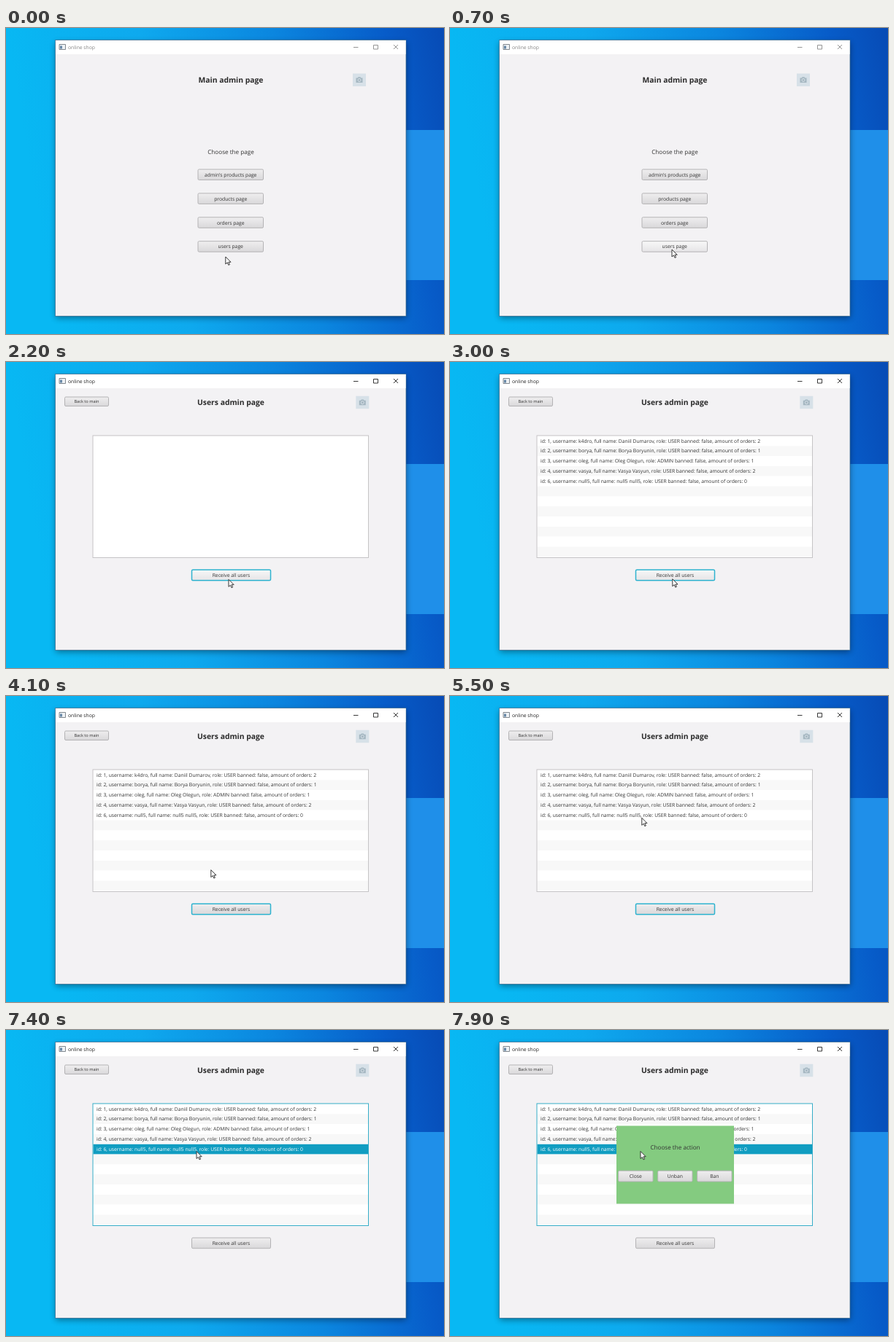
An HTML page that plays this animation: 600x420 px, repeating every 8 s.

```html
<!DOCTYPE html>
<html lang="en">
<head>
<meta charset="utf-8">
<title>online shop</title>
<style>
  html, body { margin: 0; width: 100%; height: 100%; overflow: hidden; }
  svg { display: block; width: 600px; height: 420px; }
  text { font: 6.75px "Open Sans", "Noto Sans", sans-serif; fill: #333; text-rendering: geometricPrecision; }
  .mid { text-anchor: middle; }
  .head { font-size: 10.35px; font-weight: 700; fill: #2b2b2b; }
  .note { font-size: 8.15px; }
  .small { font-size: 5.65px; }
  .btn rect { fill: url(#face); stroke: #b4b3b5; }
  .btn.hover rect { fill: url(#lit); }
  .btn.focus rect { stroke: #2fb3cf; stroke-width: 1.5; }
  #bar { fill: none; stroke: #8a8a8a; }
  #bar text { fill: #858585; stroke: none; }
  .active #bar { stroke: #222; }
  .active #bar text { fill: #222; }
  .picked text { fill: #fff; }
</style>
</head>
<body>
<svg viewBox="0 0 600 420">
  <defs>
    <linearGradient id="sky" x2="1" y2="-.12">
      <stop offset="0" stop-color="#08b8f3"/>
      <stop offset=".3" stop-color="#0ea9ee"/>
      <stop offset=".6" stop-color="#0b86df"/>
      <stop offset=".85" stop-color="#075cc9"/>
      <stop offset="1" stop-color="#0749b3"/>
    </linearGradient>
    <linearGradient id="face" x2="0" y2="1">
      <stop offset="0" stop-color="#efeeef"/>
      <stop offset="1" stop-color="#d9d8da"/>
    </linearGradient>
    <linearGradient id="lit" x2="0" y2="1">
      <stop offset="0" stop-color="#f8f8f8"/>
      <stop offset="1" stop-color="#e5e4e6"/>
    </linearGradient>
    <filter id="blur" x="-10%" y="-10%" width="120%" height="120%"><feGaussianBlur stdDeviation="4"/></filter>
    <g id="camera">
      <rect width="18" height="17.5" fill="#d7e1e8"/>
      <path d="M4.5 6H6.7L7.5 4.7H10.5L11.3 6H13.5V12.5H4.5Z" fill="#a5b7c1"/>
      <circle cx="9" cy="9" r="2" fill="#a5b7c1" stroke="#d7e1e8"/>
    </g>
  </defs>

  <rect width="600" height="420" fill="url(#sky)"/>
  <rect x="540" y="140" width="60" height="206" fill="#1f8fe9"/>
  <rect x="68" y="20" width="480" height="378" opacity=".4" filter="url(#blur)"/>
  <rect x="67.5" y="16.5" width="480.5" height="379" fill="#f3f2f4" stroke="#35658a" stroke-opacity=".7"/>
  <rect x="68" y="17" width="479.5" height="19" fill="#fff"/>

  <g id="bar">
    <text x="85" y="29">online shop</text>
    <path d="M476 26.5H482.5M503.5 23.5H509.5V29H503.5ZM531 23L537 29M537 23L531 29" stroke-width=".9"/>
    <path d="M73 22.5H81.5V29.5H73Z" fill="#eef2f5" stroke="#737b83" stroke-width=".9"/>
    <path d="M74 24.5H77V28.5H74Z" fill="#6989a8" stroke="none"/>
  </g>

  <g id="main">
    <text class="mid head" x="308" y="74.5">Main admin page</text>
    <use href="#camera" x="475" y="62.5"/>
    <text class="mid note" x="308" y="173">Choose the page</text>
  </g>
  <g id="users">
    <text class="mid head" x="308" y="59">Users admin page</text>
    <use href="#camera" x="479.3" y="46.7"/>
    <rect x="119" y="101" width="378" height="168" fill="#fff"/>
    <g id="rows"></g>
    <rect id="frame" x="119" y="101" width="377.5" height="167.5" fill="none"/>
  </g>
  <g id="dialog">
    <rect x="228" y="131.5" width="161" height="107" fill="#84cb80"/>
    <text class="mid note" x="308.5" y="164">Choose the action</text>
  </g>
  <path id="cursor" d="M0 0V10L2.4 7.9L4 11.4L5.6 10.7L4 7.3H7.2Z" fill="#fff" stroke="#222" stroke-width=".9" stroke-linejoin="round"/>
</svg>
<script>
const LOOP = 8000, OPEN = 900, LOAD = 2300, PICK = 7300;
const $ = id => document.getElementById(id);
const add = (id, markup) => $(id).insertAdjacentHTML('beforeend', markup);
const show = (id, on) => $(id).style.display = on ? '' : 'none';
const buttons = [];

function button(parent, label, x, y, w, h, focused, kind = '') {
  add(parent, `<g class="btn"><rect x="${x}" y="${y}" width="${w}" height="${h}" rx="1.5"/>
    <text class="mid ${kind}" x="${x + w / 2}" y="${y + h / 2 + (kind ? 2 : 2.5)}">${label}</text></g>`);
  buttons.push({ el: $(parent).lastElementChild, x, y, w, h, focused });
}

const never = () => false;
["admin's products page", 'products page', 'orders page', 'users page'].forEach((label, i) =>
  button('main', label, 263, 194 + i * 32.9, 89.5, 14.5, i == 3 ? t => t >= 750 : never));
button('users', 'Back to main', 80.5, 48, 60, 12.5, t => t < LOAD - 100, 'small');
button('users', 'Receive all users', 254.5, 285.2, 108, 14.5, t => t >= LOAD - 100 && t < PICK);
['Close', 'Unban', 'Ban'].forEach((label, i) =>
  button('dialog', label, 230.7 + i * 54, 193.2, 47.3, 14.8, never));

const people = [
  [1, 'k4dro', 'Daniil Dumarov', 'USER', 2],
  [2, 'borya', 'Borya Boryunin', 'USER', 1],
  [3, 'oleg', 'Oleg Olegun', 'ADMIN', 1],
  [4, 'vasya', 'Vasya Vasyun', 'USER', 2],
  [6, 'null5', 'null5 null5', 'USER', 0]
];
const ROW = 13.82;
for (let i = 0; i < 12; i++) {
  const y = 101.5 + i * ROW, p = people[i];
  const text = p ? `id: ${p[0]}, username: ${p[1]}, full name: ${p[2]}, role: ${p[3]} banned: false, amount of orders: ${p[4]}` : '';
  add('rows', `<g><rect x="119.5" y="${y}" width="377" height="${Math.min(ROW, 268.5 - y)}"/>
    <text x="124" y="${y + 9.1}">${text}</text></g>`);
}

// Pointer stops: time, x, y
const path = [
  [0, 300.8, 314], [350, 301, 313], [700, 304, 304], [1400, 302.8, 305], [2000, 305, 298.5],
  [3000, 304.8, 297.8], [3300, 304, 295], [4100, 280.8, 238.7], [4900, 265, 174],
  [5500, 262.8, 167.3], [6500, 249, 167], [7150, 261, 166.5], [LOOP, 261, 166.5]
];
function pointer(t) {
  const i = path.findIndex(p => p[0] > t), [t0, x0, y0] = path[i - 1], [t1, x1, y1] = path[i];
  const k = (t - t0) / (t1 - t0), e = k * k * (3 - 2 * k);
  return [x0 + (x1 - x0) * e, y0 + (y1 - y0) * e];
}

function draw(now) {
  const t = now % LOOP, [x, y] = pointer(t), picked = t >= PICK;
  document.querySelector('svg').classList.toggle('active', t >= 750);
  show('main', t < OPEN);
  show('users', t >= OPEN);
  show('rows', t >= LOAD);
  show('dialog', t >= PICK + 200);
  [...$('rows').children].forEach((row, i) => {
    const on = picked && i == 4;
    row.classList.toggle('picked', on);
    row.firstElementChild.setAttribute('fill', on ? '#119dc1' : i % 2 ? '#f8f8f8' : '#fff');
  });
  $('frame').setAttribute('stroke', picked ? '#36adc8' : '#c5c4c6');
  for (const b of buttons) {
    b.el.classList.toggle('focus', b.focused(t));
    b.el.classList.toggle('hover', x > b.x && x < b.x + b.w && y > b.y && y < b.y + b.h);
  }
  $('cursor').setAttribute('transform', `translate(${x} ${y})`);
}

function tick() {
  draw(performance.now());
  requestAnimationFrame(tick);
}
tick();
</script>
</body>
</html>
```
